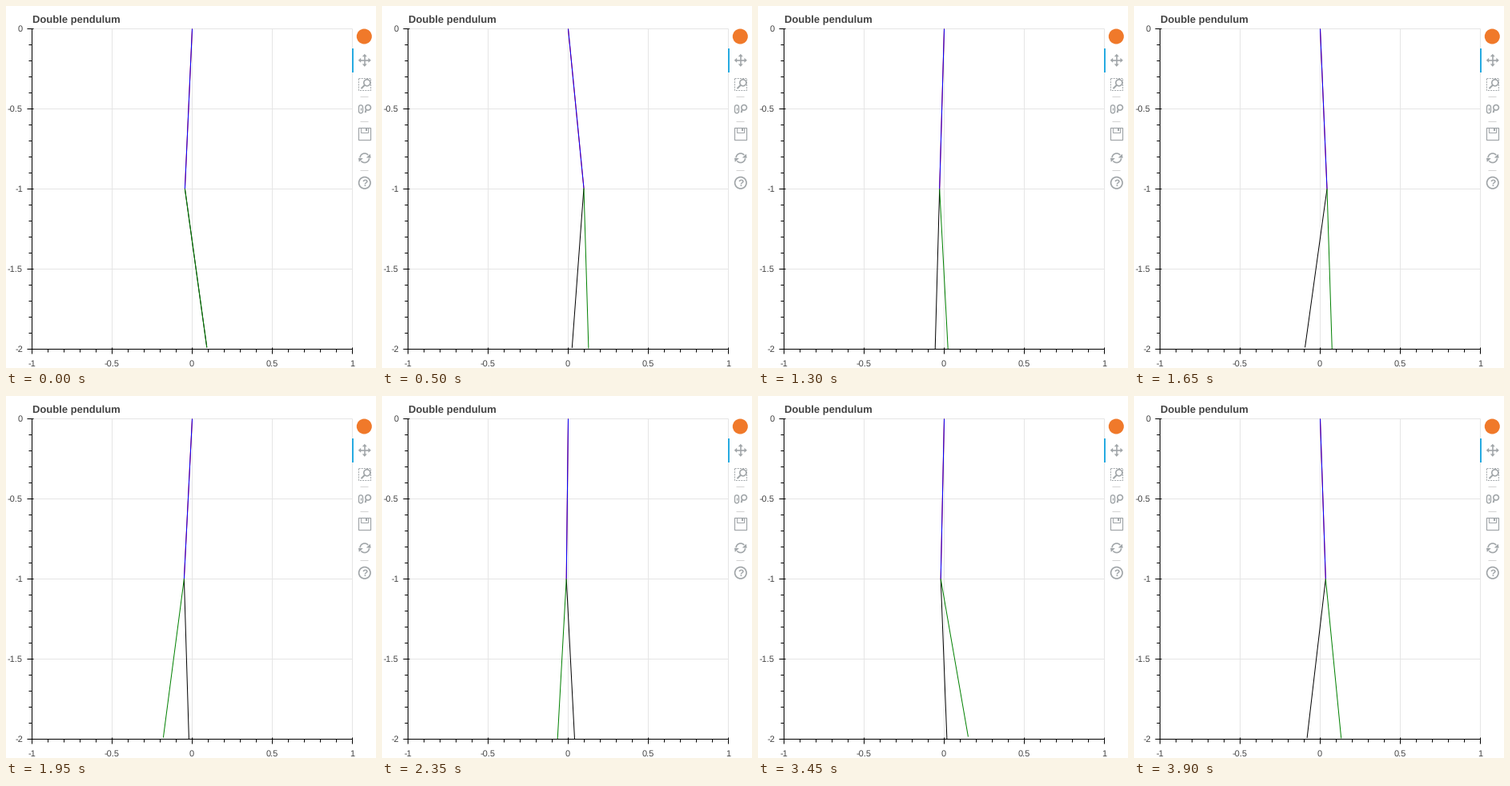
These frames come from a looping animation (462x452 px, 3.95 s). A matplotlib script:

```python
import numpy as np
import matplotlib.pyplot as plt
from matplotlib.animation import FuncAnimation
from matplotlib.patches import Arc, Circle, FancyBboxPatch, Polygon, Rectangle

W, H, DPI = 462, 452, 64
PX = 72 / DPI                      # points per pixel
FRAMES, STEP = 79, 50
LEFT, TOP, SIZE = 32, 28, 400      # straight lines snap to pixel centres
UNIT = 200
INK, GRID, ICON = "#444444", "#e5e5e5", "#a1a6a9"

plt.rcParams["font.family"] = "Liberation Sans"
plt.rcParams["text.hinting"] = "no_hinting"
fig = plt.figure(figsize=(W / DPI, H / DPI), dpi=DPI, facecolor="white")
ax = fig.add_axes([0, 0, 1, 1])
ax.set(xlim=(0, W), ylim=(H, 0))
ax.axis("off")


def line(xs, ys, color, width=1, **kw):
    kw.setdefault("solid_capstyle", "butt")
    return ax.plot(xs, ys, color=color, lw=width * PX, **kw)[0]


def label(x, y, text, size=11, color=INK, **kw):
    ax.text(x, y, text, fontsize=size * PX, color=color, va="baseline", **kw)


def shape(patch):
    return ax.add_patch(patch)


def outline(kind, *args, width=1.0, color=ICON, **kw):
    return shape(kind(*args, fill=False, ec=color, lw=width * PX, **kw))


def solid(points):
    shape(Polygon(points, fc=ICON, lw=0))


# ---- plot frame ----
def draw_axes():
    right, bottom = LEFT + SIZE, TOP + SIZE
    for k in range(5):
        d = k * SIZE / 4
        line([LEFT + d] * 2, [TOP, bottom], GRID, zorder=1)
        line([LEFT, right], [TOP + d] * 2, GRID, zorder=1)
    line([LEFT, LEFT], [TOP, bottom], "black", zorder=4)
    line([LEFT, right], [bottom, bottom], "black", zorder=4)
    for k in range(21):
        d = k * SIZE / 20
        inner, outer = (2, 6) if k % 5 == 0 else (0, 4)
        line([LEFT - outer, LEFT + inner], [TOP + d] * 2, "black", zorder=4)
        line([LEFT + d] * 2, [bottom - inner, bottom + outer], "black", zorder=4)
    for k in range(5):
        d = k * SIZE / 4
        label(LEFT - 11, TOP + d + 4, f"{-k / 2:g}" if k else "0", ha="right")
        label(LEFT + d, 450, f"{k / 2 - 1:g}", ha="center")
    label(33, 21, "Double pendulum", 13, weight="bold")


# ---- toolbar ----
def magnifier(x, y, r, dx, dy):
    outline(Circle, (x, y), r, width=1.6)
    c = 0.7 * r
    line([x - c, x - c - dx], [y + c, y + c + dy], ICON, 2)


def pan_icon(x, y):
    line([x - 6, x + 6], [y, y], ICON, 1.6)
    line([x, x], [y - 6, y + 6], ICON, 1.6)
    for dx, dy in ((1, 0), (-1, 0), (0, 1), (0, -1)):
        tip = (x + 8 * dx, y + 8 * dy)
        bx, by = x + 4.6 * dx, y + 4.6 * dy
        solid([tip, (bx + 3 * dy, by + 3 * dx), (bx - 3 * dy, by - 3 * dx)])


def box_zoom_icon(x, y):
    outline(Rectangle, (x - 7.5, y - 7.5), 15, 15, ls=(0, (2, 1.2)))
    magnifier(x + 3, y - 2, 4, 4.5, 4.5)


def wheel_zoom_icon(x, y):
    outline(FancyBboxPatch, (x - 4.8, y - 2.5), 0.01, 5,
            boxstyle="round,pad=2.5,rounding_size=2.5", width=1.4)
    line([x - 4.8, x - 4.8], [y - 2, y + 1], ICON, 1.2)
    magnifier(x + 4.3, y - 2, 3.3, 1.2, 4)


def save_icon(x, y):
    outline(Rectangle, (x - 7.5, y - 7.5), 15, 15, width=1.2)
    outline(Rectangle, (x - 4.5, y - 7.5), 9, 6)
    shape(Rectangle((x + 1.5, y - 6.5), 2, 3, fc=ICON, lw=0))


def reset_icon(x, y):
    for start, s in ((185, 1), (5, -1)):
        shape(Arc((x, y), 11.5, 11.5, theta1=start, theta2=start + 135,
                  ec=ICON, lw=1.6 * PX))
        solid([(x + s * 7.8, y), (x + s * 2, y - s * 0.4),
               (x + s * 7, y - s * 5)])


def help_icon(x, y):
    outline(Circle, (x, y), 7.2, width=1.7)
    label(x, y + 4.3, "?", 12, ICON, weight="bold", ha="center")


def draw_toolbar():
    shape(Circle((447.3, 38), 9.5, fc="#f0792a", lw=0))
    shape(Rectangle((432, 53), 2, 30, fc="#26aae1", lw=0, zorder=5))
    for icon, y in ((pan_icon, 68), (box_zoom_icon, 98),
                    (wheel_zoom_icon, 129), (save_icon, 160),
                    (reset_icon, 190), (help_icon, 221)):
        icon(447.8, y - 0.2)
    for y in (113, 144, 205):
        line([442, 452], [y, y], "#d3d3d3")


# ---- motion ----
T = np.arange(FRAMES) * STEP / 1000
KEYS = np.array([0, 0.5, 1.3, 1.95, 2.35, 3.0, 3.9])
UPPER = np.array([-9.1, 19.5, -5.8, -10.1, -2.3, 2.1, 6.8]) / UNIT
LOWER = np.array([27.4, -14.7, -5.5, 6, 10.3, 12.5, -23.2]) / UNIT
OTHER = np.array([27.4, 5.9, 10.5, -26, -11, -21, 19.4]) / UNIT


def swing(values, freqs, slack):
    """Oscillation built from the given frequencies through the key poses."""
    def kernel(a, b):
        d = a[:, None] - b[None, :]
        waves = sum(np.cos(w * d) for w in freqs) / len(freqs)
        return waves + slack * np.exp(-d ** 2 / 0.12)
    return kernel(T, KEYS) @ np.linalg.solve(kernel(KEYS, KEYS), values)


# normal modes of two equal masses on unit rods
R2 = np.sqrt(2)
slow = swing((UPPER + LOWER / R2) / 2, [2.396], 0.01)
fast = swing((UPPER - LOWER / R2) / 2, [5.72], 0.01)
upper = slow + fast
lower = R2 * (slow - fast)
other = swing(OTHER, np.linspace(2.4, 5.72, 6), 0.02)


def rod(x, y, sine):
    return x + UNIT * sine, y + UNIT * np.sqrt(1 - sine ** 2)


draw_axes()
draw_toolbar()
PIVOT = (LEFT + SIZE / 2 + 0.5, TOP + 0.5)
clip = Rectangle((LEFT, TOP), SIZE, SIZE, transform=ax.transData)
rods = [line([], [], c, zorder=3) for c in ("red", "black", "blue", "green")]
for r in rods:
    r.set_clip_path(clip)


def update(i):
    joint = rod(*PIVOT, upper[i])
    ends = ((PIVOT, joint), (joint, rod(*joint, lower[i])),
            (PIVOT, joint), (joint, rod(*joint, other[i])))
    for r, pair in zip(rods, ends):
        r.set_data(*zip(*pair))
    return rods


anim = FuncAnimation(fig, update, frames=FRAMES, interval=STEP,
                     repeat=True, repeat_delay=0, blit=False)
plt.show()
```
